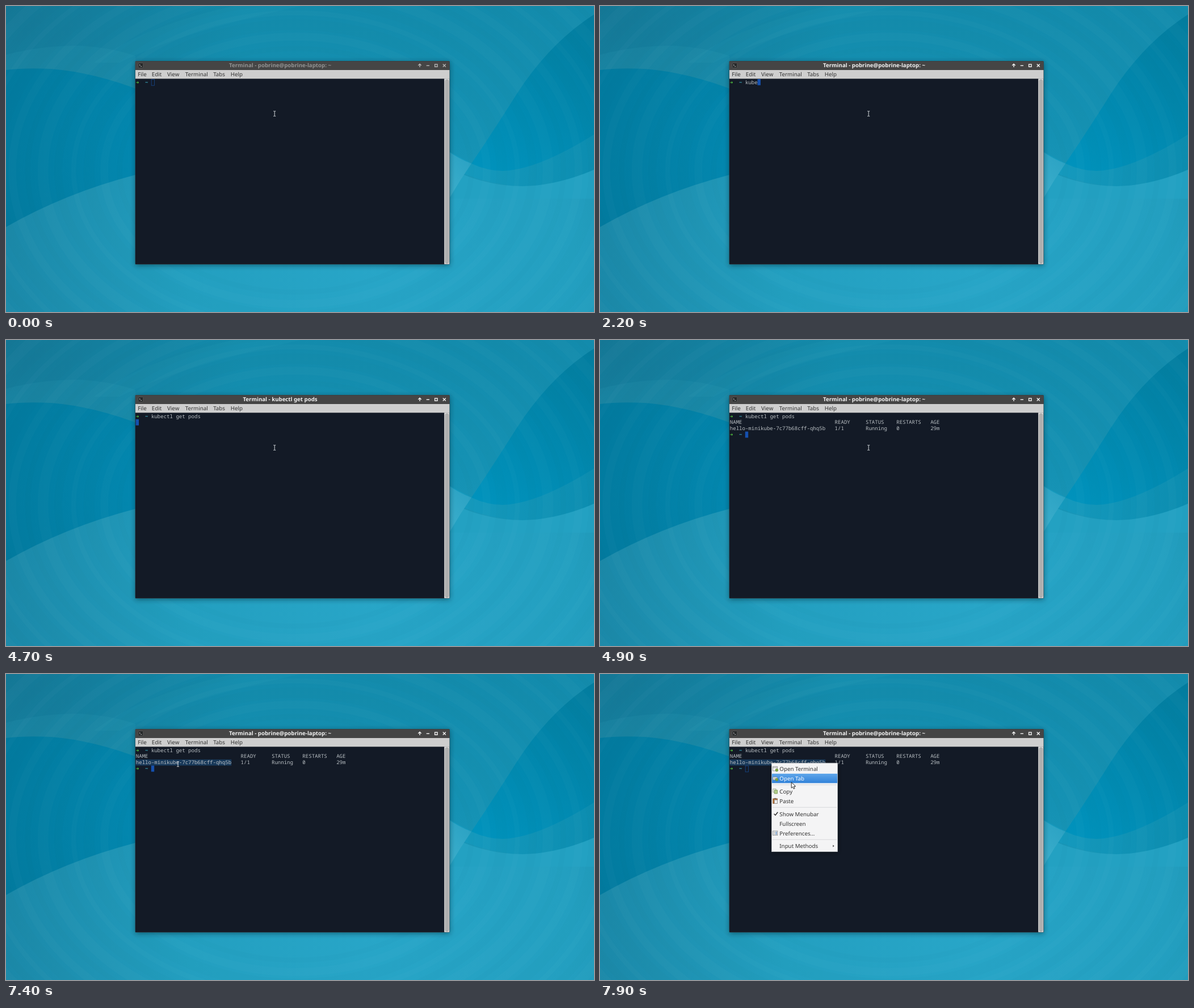
Recreate the animation shown at these times as an HTML page. Size 1036 px wide and 540 px high, loop 8 s.

```html
<!DOCTYPE html>
<html lang="en">
<head>
<meta charset="utf-8">
<title>Terminal</title>
<style>
  html, body { margin: 0; width: 100%; height: 100%; overflow: hidden; background: #1690b1; }
  svg { display: block; }
  text { white-space: pre; text-rendering: geometricPrecision; }
  .ui { font: 9.75px "Noto Sans", "Open Sans", sans-serif; fill: #333; }
  .title { font: bold 9.68px "Noto Sans", "Open Sans", sans-serif; text-anchor: middle; }
  .mono { font: 9.06px "Noto Sans Mono", "DejaVu Sans Mono", monospace; fill: #b9bfc3; }
  .arrow { font: bold 9px "DejaVu Sans Mono", "DejaVu Sans", monospace; fill: #5bdc43; }
  .path { font-weight: bold; fill: #45c5dd; }
</style>
</head>
<body>
<svg id="stage" width="1036" height="540" viewBox="0 0 1036 540" xmlns="http://www.w3.org/2000/svg">
  <defs>
    <linearGradient id="base" x1="0" y1="0" x2="0" y2="1">
      <stop offset="0" stop-color="#138bac"/>
      <stop offset=".45" stop-color="#1592b4"/>
      <stop offset="1" stop-color="#22a0c1"/>
    </linearGradient>
    <radialGradient id="corner" gradientUnits="userSpaceOnUse" cx="0" cy="0" r="420">
      <stop offset="0" stop-color="#15718e" stop-opacity=".75"/>
      <stop offset="1" stop-color="#15718e" stop-opacity="0"/>
    </radialGradient>
    <radialGradient id="left" gradientUnits="userSpaceOnUse" cx="300" cy="260" r="320">
      <stop offset="0" stop-color="#038bb4"/>
      <stop offset="1" stop-color="#027a9e"/>
    </radialGradient>
    <radialGradient id="floor" gradientUnits="userSpaceOnUse" cx="660" cy="450" r="680">
      <stop offset="0" stop-color="#28a6c8"/>
      <stop offset=".5" stop-color="#239fc0"/>
      <stop offset="1" stop-color="#1a87a7"/>
    </radialGradient>
    <linearGradient id="right" gradientUnits="userSpaceOnUse" x1="1036" y1="30" x2="850" y2="290">
      <stop offset="0" stop-color="#037d9f"/>
      <stop offset="1" stop-color="#0092bc"/>
    </linearGradient>
    <linearGradient id="band" gradientUnits="userSpaceOnUse" x1="782" y1="0" x2="1036" y2="0">
      <stop offset="0" stop-color="#169bbf"/>
      <stop offset="1" stop-color="#0c8db0"/>
    </linearGradient>
    <linearGradient id="facet" gradientUnits="userSpaceOnUse" x1="822" y1="270" x2="775" y2="325">
      <stop offset="0" stop-color="#2ba2c3"/>
      <stop offset="1" stop-color="#3aadcb"/>
    </linearGradient>
    <linearGradient id="pick" x1="0" y1="0" x2="0" y2="1">
      <stop offset="0" stop-color="#5fa6ea"/>
      <stop offset="1" stop-color="#3182d9"/>
    </linearGradient>
    <filter id="soft" x="-10%" y="-10%" width="120%" height="120%">
      <feGaussianBlur stdDeviation="4"/>
    </filter>
  </defs>

  <g id="wallpaper">
    <rect width="1036" height="540" fill="url(#base)"/>
    <rect width="1036" height="540" fill="url(#corner)"/>
    <path d="M0 86Q60 70 128 70Q185 73 228 88V160H0Z" fill="#3aa5b8" fill-opacity=".13"/>
    <path d="M155 100Q235 38 400 0H520Q310 45 200 100Z" fill="#4ab0c4" fill-opacity=".06"/>
    <path d="M0 113Q30 109 80 111Q155 117 240 150V300L0 395Z" fill="url(#left)"/>
    <path d="M0 390Q105 330 228 298Q420 255 600 300L782 338Q840 318 910 318Q980 316 1036 289V540H0Z" fill="url(#floor)"/>
    <path d="M770 250Q835 291 875 291Q935 290 1036 227V289Q970 318 910 318Q845 317 770 280Z" fill="url(#band)"/>
    <path d="M782 287Q845 318 910 318Q970 317 1036 289V340H782Z" fill="#23a1c2"/>
    <path d="M1036 15Q958 65 900 155Q858 222 820 278Q848 291 875 291Q935 290 1036 227Z" fill="url(#right)"/>
    <path d="M770 250Q797 270 820 278Q800 307 782 338L770 345Z" fill="url(#facet)"/>
    <g id="rings" fill="none"></g>
  </g>

  <rect x="228" y="99" width="554" height="359" fill="#002a38" fill-opacity=".55" filter="url(#soft)"/>
  <g id="window">
    <rect x="227.6" y="97" width="554.2" height="359" rx="1.5" fill="#3a3d40"/>
    <rect x="228" y="97.8" width="553.4" height="15.2" fill="#454545"/>
    <rect x="228" y="113" width="553.4" height="15.6" fill="#cecece"/>
    <rect x="228" y="128.5" width="544.2" height="327" fill="#131a26"/>
    <rect x="772.2" y="128.5" width="9" height="327" fill="#dedede"/>
    <rect x="773.9" y="130" width="6" height="324" rx="2.6" fill="#b0b0b0" stroke="#989898" stroke-width=".6"/>
    <rect x="233" y="100.7" width="8.6" height="8.4" rx="1" fill="#252728" stroke="#666" stroke-width=".6"/>
    <path d="M234.8 103L236.5 104.4L234.8 105.8M237 106.6H239.4" fill="none" stroke="#d4d4d4" stroke-width=".8"/>
    <text id="title" class="title" x="483" y="108.4"></text>
    <g id="buttons" fill="none" stroke-width="1.4">
      <path d="M729 108V102.6M726.3 105L729 102.3L731.7 105"/>
      <path d="M740.7 105.2H746"/>
      <rect x="755.6" y="102.9" width="4.4" height="4.4"/>
      <path d="M769.8 102.4L774.8 107.4M774.8 102.4L769.8 107.4"/>
    </g>
    <g id="bar"></g>
  </g>

  <g id="screen">
    <rect id="selection" x="228.6" y="150.8" width="168.6" height="10.8" fill="#18395a"/>
    <rect id="cursor" width="5.4" height="10.8"/>
    <g id="lines"></g>
  </g>

  <g id="menu">
    <rect x="302" y="158" width="118" height="157.5" fill="#000" fill-opacity=".35" filter="url(#soft)"/>
    <rect x="302.5" y="157.2" width="116" height="156.2" fill="#f4f4f5" stroke="#c3c5c8" stroke-width=".8"/>
    <rect id="pick-row" x="302.9" width="115.3" height="16.6" fill="url(#pick)"/>
    <path d="M304 195.5H417M304 235.3H417M304 292.2H417" stroke="#d5d6d8" stroke-width=".9"/>
    <g id="items"></g>
    <g stroke-width=".8">
      <rect x="304.6" y="163.3" width="8" height="7.6" fill="#f5f5f5" stroke="#85878a"/>
      <path d="M304.6 165.2H312.6" stroke="#85878a"/>
      <circle cx="311.4" cy="169.6" r="2.3" fill="#83ad45" stroke="#5f852d"/>
      <path d="M304.6 186.8V181.8H311L312.8 183.6V186.8Z" fill="#e3e5e6" stroke="#85878a"/>
      <path d="M306 184.3H310" stroke="#9a9da0"/>
      <circle cx="311.4" cy="186.4" r="2.3" fill="#83ad45" stroke="#5f852d"/>
      <rect x="304.8" y="202.8" width="5.2" height="6" fill="#e9ece4" stroke="#96a087"/>
      <rect x="307.3" y="205" width="5.2" height="6" fill="#b4d08b" stroke="#6d8e45"/>
      <rect x="304.8" y="220" width="7.8" height="8.4" fill="#b9763c" stroke="#815127"/>
      <rect x="307.3" y="222.2" width="5.3" height="6.2" fill="#f2f2f2" stroke="#909090"/>
      <path d="M307 219.6H310.4" stroke="#666" stroke-width="1.4"/>
      <rect x="304.6" y="277" width="8.2" height="7.6" fill="#eceeef" stroke="#808386"/>
      <path d="M306 279.4H308.4M306 282.2H308.4" stroke="#777"/>
      <path d="M309.3 279.4H311.6M309.3 282.2H311.6" stroke="#3d77b8" stroke-width="1.5"/>
    </g>
    <path d="M306.6 246.8L309 249.2L313.2 243.8" fill="none" stroke="#2d2d2d" stroke-width="1.5"/>
    <path d="M410.4 301.6L412.6 303.5L410.4 305.4Z" fill="#333"/>
  </g>

  <path id="beam" d="M-2 -4.4H-.6L0 -4L.6 -4.4H2M0 -4V4M-2 4.4H-.6L0 4L.6 4.4H2" fill="none" stroke="#dfe3e6" stroke-width=".95"/>
  <path id="pointer" d="M0 0V10.2L2.4 8L4 11.7L5.9 10.9L4.3 7.3H7.5Z" fill="#fff" stroke="#111" stroke-width=".9"/>
</svg>
<script>
const LOOP = 8000;
const CELL = { x: 228.8, y: 129, w: 5.436, h: 10.87 };
const HOME = "Terminal - pobrine@pobrine-laptop: ~";
const COMMAND = "kubectl get pods";
const $ = id => document.getElementById(id);

function add(parent, tag, attrs, text) {
  const el = document.createElementNS("http://www.w3.org/2000/svg", tag);
  for (const key in attrs) el.setAttribute(key, attrs[key]);
  if (text) el.textContent = text;
  parent.appendChild(el);
  return el;
}

function show(el, on) {
  el.style.display = on ? "" : "none";
}

function move(el, x, y) {
  el.setAttribute("transform", `translate(${x} ${y})`);
}

function cell(parent, text, row, col, cls = "mono") {
  const x = CELL.x + col * CELL.w, y = CELL.y + 8.5 + row * CELL.h;
  return add(parent, "text", { class: cls, x, y }, text);
}

function prompt(parent, row) {
  cell(parent, "➜", row, 0, "arrow");
  cell(parent, "~", row, 3, "mono path");
}

// Faint rings over the wallpaper
for (let i = 0; i < 14; i++) {
  add($("rings"), "ellipse", {
    cx: 510, cy: 290, rx: 310 + i * 27, ry: 215 + i * 21,
    stroke: i % 2 ? "#fff" : "#00405c", "stroke-width": 9 + i % 3 * 5, "stroke-opacity": .016
  });
}

[["File", 232.2], ["Edit", 256.8], ["View", 284], ["Terminal", 315.8], ["Tabs", 365.2], ["Help", 395.8]]
  .forEach(([name, x]) => add($("bar"), "text", { class: "ui", x, y: 124.4 }, name));

const items = [
  ["Open Terminal", 167], ["Open Tab", 184], ["Copy", 207], ["Paste", 224],
  ["Show Menubar", 247], ["Fullscreen", 264], ["Preferences...", 281], ["Input Methods", 303.6]
].map(([name, y]) => add($("items"), "text", { class: "ui", x: 316.3, y: y + 3.5 }, name));

prompt($("lines"), 0);
const typed = cell($("lines"), "", 0, 5);
const output = add($("lines"), "g", {});
[["NAME", 0], ["READY", 34], ["STATUS", 44], ["RESTARTS", 54], ["AGE", 65]]
  .forEach(([text, col]) => cell(output, text, 1, col));
[["hello-minikube-7c77b68cff-qhq5b", 0], ["1/1", 34], ["Running", 44], ["0", 54], ["29m", 65]]
  .forEach(([text, col]) => cell(output, text, 2, col));
prompt(output, 3);

function typedCount(t) {
  if (t >= 4500) return COMMAND.length;
  return t < 1600 ? 0 : Math.min(4, 1 + Math.floor((t - 1600) / 200));
}

function beamAt(t) {
  if (t < 6200) return [473.2, 190];
  if (t < 6400) return [304.2, 169.8];
  return t < 6700 ? [303, 164.8] : [303, 159];
}

function drawCursor(row, col, filled) {
  const c = $("cursor"), inset = filled ? 0 : .4;
  c.setAttribute("x", CELL.x + col * CELL.w - .2 + inset);
  c.setAttribute("y", CELL.y + row * CELL.h + inset);
  c.setAttribute("fill", filled ? "#1550ae" : "none");
  c.setAttribute("stroke", filled ? "none" : "#17498f");
  c.setAttribute("stroke-width", .8);
}

function draw(t) {
  const active = t >= 500, sent = t >= 4700, done = t >= 4900, menu = t >= 7700;
  const count = typedCount(t);

  $("title").textContent = sent && !done ? "Terminal - " + COMMAND : HOME;
  $("title").setAttribute("fill", active ? "#f2f2f2" : "#929292");
  $("buttons").setAttribute("stroke", active ? "#f2f2f2" : "#b4b4b4");

  typed.textContent = COMMAND.slice(0, count);
  show(output, done);
  show($("selection"), t >= 7400);
  if (done) drawCursor(3, 5, !menu);
  else if (sent) drawCursor(1, 0, true);
  else drawCursor(0, 5 + count, active);

  const pick = t >= 7900 ? 1 : 0;
  show($("menu"), menu);
  $("pick-row").setAttribute("y", 158.9 + pick * 17);
  items.forEach((el, i) => { el.style.fill = i === pick ? "#fff" : "#333"; });

  show($("beam"), !menu);
  show($("pointer"), menu);
  move($("beam"), ...beamAt(t));
  move($("pointer"), ...(pick ? [337.2, 191] : [302.4, 158.2]));
}

function tick() {
  draw(performance.now() % LOOP);
  requestAnimationFrame(tick);
}
tick();
</script>
</body>
</html>
```
